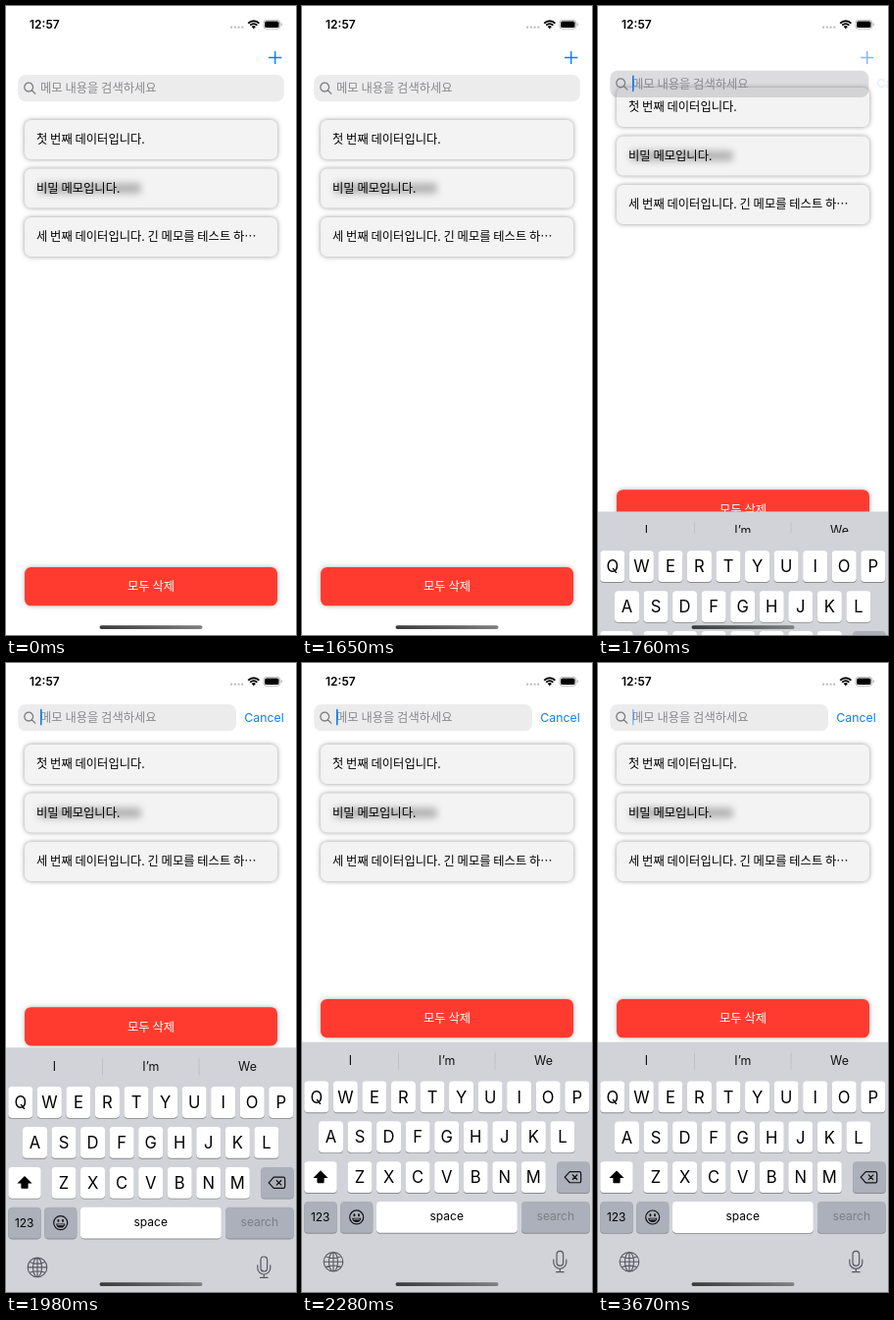
An HTML page with a canvas that plays this animation: 296 by 640 pixels, repeating every 3770 ms.

```html
<!DOCTYPE html>
<html lang="ko">
<head>
<meta charset="utf-8">
<style>
html, body { margin: 0; width: 100%; height: 100%; overflow: hidden; background: #fff; }
canvas { display: block; width: 296px; height: 640px; }
</style>
</head>
<body>
<canvas id="stage"></canvas>
<script>
const W = 296, H = 640, LOOP = 3770;
const STEPS = [0, 1540, 1650, 1760, 1870, 1980, 2280, 2550, 2670, 3200, 3320, 3560, 3670];
const LATIN = 'Inter, Roboto, sans-serif';
const KOREAN = '"Noto Sans CJK KR", "Noto Sans CJK JP", "Noto Sans CJK", sans-serif';
const BLUE = '#0a7cff';

const canvas = document.getElementById('stage');
const c = canvas.getContext('2d');
const dpr = window.devicePixelRatio || 1;
canvas.width = W * dpr;
canvas.height = H * dpr;

const ramp = (t, a, b) => Math.min(1, Math.max(0, (t - a) / (b - a)));
const mix = (a, b, p) => a + (b - a) * p;
const smooth = x => x * x * (3 - 2 * x);

// Slightly underdamped spring from 0 to 1
const spring = (t, start) => {
  const x = Math.max(0, t - start) * 0.0141, w = 0.4;
  return 1 - Math.exp(-x) * (Math.cos(w * x) + Math.sin(w * x) / w);
};

function text(str, x, y, size, color, { font = LATIN, align = 'left', weight = 400 } = {}) {
  c.font = `${weight} ${size}px ${font}`;
  c.textAlign = align;
  c.fillStyle = color;
  c.fillText(str, x, y);
}

const korean = (str, x, y, color, align) => text(str, x, y, 12.3, color, { font: KOREAN, align });
const centered = (str, x, y, size, color = '#000') => text(str, x, y, size, color, { align: 'center' });

function box(x, y, w, h, r, fill) {
  c.beginPath();
  c.roundRect(x, y, w, h, r);
  c.fillStyle = fill;
  c.fill();
}

function shadowBox(x, y, w, h, r, fill, shadow) {
  c.save();
  c.shadowColor = shadow;
  c.shadowBlur = 5 * dpr;
  box(x, y, w, h, r, fill);
  c.restore();
}

function line(path, color, width = 1.1) {
  c.strokeStyle = color;
  c.lineWidth = width;
  c.stroke(new Path2D(path));
}

// Draws with the origin moved to (x, y)
function at(x, y, draw) {
  c.save();
  c.translate(x, y);
  draw();
  c.restore();
}

function statusBar() {
  text('12:57', 24, 23.2, 12, '#000', { weight: 600 });
  for (let i = 0; i < 4; i++) box(229 + i * 3.7, 20.6, 2.2, 2.2, 1.1, '#b8b8b8');
  at(252.8, 23.2, () => {
    const a = Math.PI * 1.25, b = Math.PI * 1.75;
    c.strokeStyle = '#000';
    c.lineCap = 'butt';
    c.lineWidth = 1.9;
    for (const r of [5, 7.9]) {
      c.beginPath();
      c.arc(0, 0, r, a, b);
      c.stroke();
    }
    c.beginPath();
    c.moveTo(0, 0);
    c.arc(0, 0, 3, a, b);
    c.fillStyle = '#000';
    c.fill();
  });
  c.beginPath();
  c.roundRect(262.9, 14.4, 16.8, 8.8, 2.7);
  c.strokeStyle = '#a5a5a5';
  c.lineWidth = 0.8;
  c.stroke();
  box(264.1, 15.6, 14.4, 6.4, 1.6, '#000');
  box(280.6, 17.3, 1, 3, 0.5, '#a5a5a5');
}

function cards(shift) {
  const notes = ['첫 번째 데이터입니다.', '비밀 메모입니다.', '세 번째 데이터입니다. 긴 메모를 테스트 하⋯'];
  notes.forEach((note, i) => {
    const y = 116 + i * 49.5 - shift;
    shadowBox(19, y, 258, 40, 6.5, '#f3f3f3', 'rgba(0,0,0,.4)');
    if (i === 1) {
      c.save();
      c.filter = `blur(${3.5 * dpr}px)`;
      box(33, y + 14.5, 105, 11, 4, 'rgba(0,0,0,.25)');
      c.restore();
    }
    korean(note, 31, y + 24.4, '#000');
  });
}

function deleteButton(y) {
  shadowBox(19, y, 258, 39.3, 6.5, '#ff3b30', 'rgba(0,0,0,.3)');
  korean('모두 삭제', 148, y + 24.4, '#fff', 'center');
}

function searchBar(p, caret) {
  const y = mix(70, 42, p), right = mix(283.7, 235, p);
  box(12.3, y, right - 12.3, 27.3, 7.6, `rgba(118,118,128,${p ? 0.27 - 0.13 * p : 0.14})`);
  at(23.2, y + 12.6, () => line('M4.4 0A4.4 4.4 0 1 1-4.4 0A4.4 4.4 0 1 1 4.4 0M3.2 3.2L7 7', '#7d7d82', 1.3));
  korean('메모 내용을 검색하세요', 35, y + 18, '#8a8a8e');
  if (caret) {
    c.globalAlpha = caret;
    box(35, y + 4.8, 1.6, 16.6, 0.8, BLUE);
  }
  c.globalAlpha = Math.max(0, 1 - p * 3);
  at(274.7, 52.5, () => line('M-6.6 0H6.6M0-6.6V6.6', BLUE, 1.4));
  c.globalAlpha = p;
  text('Cancel', mix(292, 243.3, p), y + 17.7, 12.3, BLUE);
  c.globalAlpha = 1;
}

function key(x, y, w, fill = '#fff') {
  box(x, y + 0.9, w, 31.8, 3.8, '#898b90');
  box(x, y, w, 31.8, 3.8, fill);
}

function keyboard(top) {
  const dark = '#abb0ba', ink = '#55585e';
  c.save();
  c.translate(0, top);
  c.fillStyle = '#d1d3d9';
  c.fillRect(0, 0, W, H);

  // The suggestion strip is still cut short early in the rise
  c.save();
  c.beginPath();
  c.rect(0, 0, W, top > 500 ? 21.5 : 40);
  c.clip();
  ['I', 'I’m', 'We'].forEach((word, i) => centered(word, 49.3 + i * 98.6, 23.6, 12.4, '#111'));
  line('M98.5 11V28M197 11V28', '#b9bbc1', 0.8);
  c.restore();

  ['QWERTYUIOP', 'ASDFGHJKL', 'ZXCVBNM'].forEach((row, r) => {
    const left = [2.3, 17, 46.5][r], y = 39.8 + r * 40.9;
    [...row].forEach((ch, i) => {
      const x = left + i * 29.55;
      key(x, y, 25);
      centered(ch, x + 12.5, y + 22.1, 16.6);
    });
  });

  key(2.3, 121.6, 33.4);
  at(19, 137.5, () => {
    c.fillStyle = '#000';
    c.fill(new Path2D('M0-6.8L7.6 .8H3.6V5.2Q3.6 6 2.8 6H-2.8Q-3.6 6-3.6 5.2V.8H-7.6Z'));
  });
  key(260.2, 121.6, 33.4, dark);
  at(276.5, 137.5, () => {
    c.lineJoin = 'round';
    line('M-8.3 0L-3.2-5.6H6.6Q8.2-5.6 8.2-4V4Q8.2 5.6 6.6 5.6H-3.2ZM-.6-2.6L4.6 2.6M4.6-2.6L-.6 2.6', '#111', 1.2);
  });

  key(2.3, 162.4, 33.4, dark);
  centered('123', 18.7, 182.6, 12);
  key(39.3, 162.4, 33, dark);
  at(55.7, 178.3, () => {
    line('M7 0A7 7 0 1 1-7 0A7 7 0 1 1 7 0', '#111', 1.2);
    c.fillStyle = '#111';
    c.fill(new Path2D('M-4.6 .8H4.6Q4.1 5 0 5T-4.6 .8Z'));
    box(-3.2, -3.7, 1.8, 2.9, 0.9, '#111');
    box(1.4, -3.7, 1.8, 2.9, 0.9, '#111');
    box(-3.3, 1.6, 6.6, 1, 0.4, dark);
  });
  key(76, 162.4, 143.8);
  centered('space', 147.7, 181.6, 12);
  key(224, 162.4, 69.6, dark);
  centered('search', 258.8, 181.6, 12, '#7b7f87');

  at(32, 223.6, () => line(
    'M9.8 0A9.8 9.8 0 1 1-9.8 0A9.8 9.8 0 1 1 9.8 0M4.5 0A4.5 9.8 0 1 1-4.5 0A4.5 9.8 0 1 1 4.5 0' +
    'M0-9.8V9.8M-9.8 0H9.8M-8.1-5.4Q0-2.2 8.1-5.4M-8.1 5.4Q0 2.2 8.1 5.4', ink));
  at(263.3, 223, () => {
    c.lineCap = 'round';
    line('M-3.3-7A3.3 3.3 0 0 1 3.3-7V1.4A3.3 3.3 0 0 1-3.3 1.4ZM-6.5-1.5V1.2A6.5 6.5 0 0 0 6.5 1.2V-1.5M0 7.7V11M-3.8 11H3.8', ink, 1.2);
  });
  c.restore();
}

function homeBar() {
  const g = c.createLinearGradient(95, 0, 201, 0);
  g.addColorStop(0, '#3a3a3a');
  g.addColorStop(1, '#808080');
  box(95.5, 630.2, 105, 3.8, 1.9, g);
}

function caretAlpha(t) {
  if (t < 1700) return 0;
  if (t < 3000) return 1 - ramp(t, 2490, 2610);
  if (t < 3500) return ramp(t, 3140, 3260);
  return 1 - ramp(t, 3500, 3800);
}

function draw(t) {
  c.setTransform(dpr, 0, 0, dpr, 0, 0);
  c.fillStyle = '#fff';
  c.fillRect(0, 0, W, H);
  statusBar();
  cards(t < 1690 ? 0 : 33);
  deleteButton(mix(571, 342, spring(t, 1682)));
  searchBar(smooth(ramp(t, 1691, 1971)), caretAlpha(t));
  const rise = spring(t, 1655);
  if (rise > 0) keyboard(mix(640, 385.7, rise));
  homeBar();
}

const start = performance.now();
function tick() {
  const t = (performance.now() - start) % LOOP;
  draw(STEPS.findLast(s => s <= t) ?? 0);
  requestAnimationFrame(tick);
}
tick();
</script>
</body>
</html>
```
